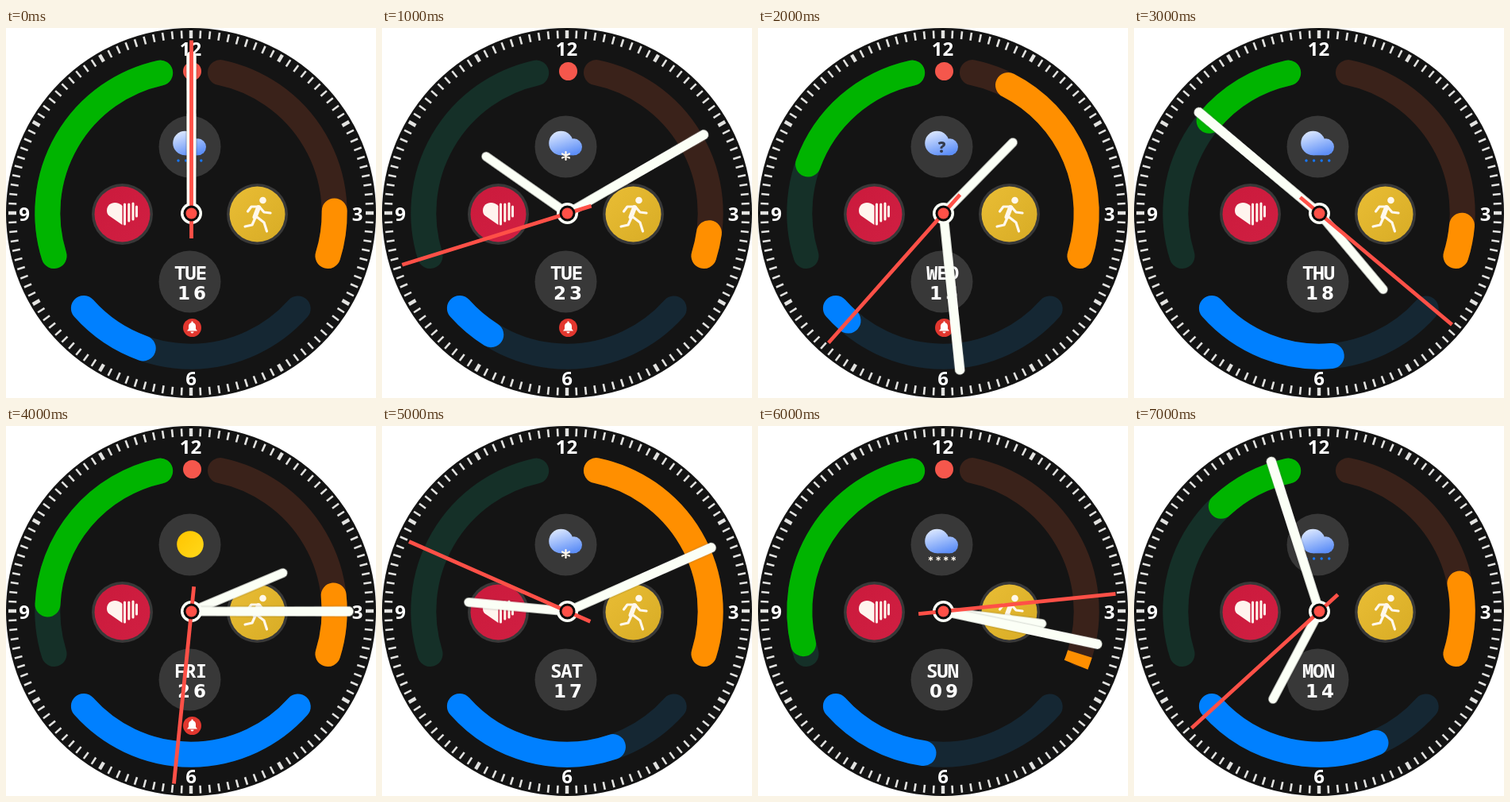
An HTML page for the animation above (8000 ms loop, 466 by 466 pixels).

```html
<!DOCTYPE html>
<html lang="en">
<head>
<meta charset="utf-8">
<title>Watch face</title>
<style>
  html, body { margin: 0; width: 100%; height: 100%; overflow: hidden; background: #fff; }
  svg { display: block; width: 466px; height: 466px; }
  text { fill: #fff; text-anchor: middle; }
  .hour-no { font: 700 24px "Open Sans", "Noto Sans", sans-serif; }
  #day { font: 700 24px "Noto Sans Mono", "DejaVu Sans Mono", monospace; letter-spacing: -1px; }
  #date { font: 700 23px "DejaVu Sans", sans-serif; letter-spacing: 4px; }
  .arc { fill: none; stroke-width: 32; stroke-linecap: round; }
  .hand { fill: #fbfff6; filter: drop-shadow(0 1px 1px rgba(0, 0, 0, .35)); }
  .line { fill: none; stroke: #fff8ec; stroke-linecap: round; stroke-linejoin: round; }
</style>
</head>
<body>
<svg viewBox="0 0 466 466">
  <defs>
    <linearGradient id="cloudFill" gradientUnits="userSpaceOnUse" x1="223" y1="130" x2="233" y2="161">
      <stop offset="0" stop-color="#d8e5ff"/><stop offset="1" stop-color="#5e8ff7"/>
    </linearGradient>
    <linearGradient id="sunFill" x1="0" y1="0" x2="1" y2="1">
      <stop offset="0" stop-color="#ffc400"/><stop offset="1" stop-color="#ffd91a"/>
    </linearGradient>
    <linearGradient id="redFill" x1="0" y1="0" x2="1" y2="1">
      <stop offset="0" stop-color="#cb1a3c"/><stop offset="1" stop-color="#d01f42"/>
    </linearGradient>
    <linearGradient id="goldFill" x1="0" y1="0" x2="1" y2="1">
      <stop offset="0" stop-color="#e9bd35"/><stop offset="1" stop-color="#d8ac25"/>
    </linearGradient>
  </defs>

  <circle cx="233" cy="233" r="233" fill="#141414"/>
  <g id="ticks" stroke="#e2e2e0"></g>
  <g class="hour-no">
    <text x="232.500" y="35.3">12</text>
    <text x="442.5" y="242.5">3</text>
    <text x="233" y="449.5">6</text>
    <text x="23" y="242.5">9</text>
  </g>
  <g id="arcs"></g>

  <g fill="#383838">
    <circle cx="231.5" cy="149.5" r="39"/>
    <circle cx="231.5" cy="319.5" r="39"/>
    <circle cx="146.5" cy="234.5" r="38.5"/>
    <circle cx="316.5" cy="234.5" r="38.5"/>
  </g>
  <circle cx="146.5" cy="234.5" r="35" fill="url(#redFill)"/>
  <circle cx="316.5" cy="234.5" r="35" fill="url(#goldFill)"/>

  <path d="M146.500 224C140 217 127 219 127 230Q127 234 130 236.500L146.500 248Z" fill="#fff4ee"/>
  <path d="M149.500 222V247M154.800 222V243M160 221V241M164.500 225V237" class="line" stroke-width="3"/>

  <circle cx="323.500" cy="217" r="4.300" fill="#fff8ec"/>
  <g class="line" stroke-width="3.200">
    <path d="M318 226L313.500 238" stroke-width="6"/>
    <path d="M304.500 231L309 225L319 225L325 232L333 233"/>
    <path d="M314 239L310 248L301 250M316 238L325 245L328.500 256"/>
  </g>

  <g id="sun"><circle cx="232" cy="149" r="16.800" fill="url(#sunFill)"/></g>
  <g id="cloud" fill="url(#cloudFill)">
    <circle cx="225.500" cy="145" r="15.300"/>
    <circle cx="241.500" cy="149.800" r="10.500"/>
    <rect x="225.500" y="148" width="16" height="12.300"/>
  </g>
  <text id="ask" x="231.500" y="157" style="font:800 19px 'Open Sans',sans-serif;fill:#343b4c">?</text>
  <path id="snow" class="line" stroke-width="2.200" d="M231.500 156V166M227 158.500L236 163.500M227 163.500L236 158.500"/>
  <g id="flurry"></g>
  <g id="rain" fill="#1677ff"></g>

  <text id="day" x="232" y="317"></text>
  <text id="date" x="236" y="341.500"></text>

  <circle id="link" cx="234.500" cy="54.500" r="11.500" fill="#f5574c"/>
  <g id="bell">
    <circle cx="234.500" cy="377.500" r="11.500" fill="#e2372f"/>
    <path d="M228 381.500L230 379V375.500A4.500 4.500 0 0 1 239 375.500V379L241 381.500ZM232.500 382.500H236.500A2 2 0 0 1 232.500 382.500ZM233.500 369.500H235.500V372H233.500Z" fill="#fff"/>
  </g>

  <g transform="translate(233.500 233.500)">
    <g id="hour"><path class="hand" d="M-5.700 0V-125A5.700 5.700 0 0 1 5.700 -125V0Z"/></g>
    <g id="minute"><path class="hand" d="M-5.700 0L-6.200 -198A6.200 6.200 0 0 1 6.200 -198L5.700 0Z"/></g>
    <circle r="13.500" fill="#fbfff6"/>
    <g id="second"><path d="M0 31.500V-218" stroke="#ff5047" stroke-width="4.800"/></g>
    <circle r="10" fill="#0b0b0b"/>
    <circle r="7" fill="#ff5047"/>
  </g>
</svg>

<script>
const STEP = 1000, MID = 233, RADIUS = 180.7;
const $ = id => document.getElementById(id);

function add(parent, tag, attrs) {
  const el = document.createElementNS("http://www.w3.org/2000/svg", tag);
  for (const key in attrs) el.setAttribute(key, attrs[key]);
  return parent.appendChild(el);
}

// Clockwise degrees from twelve o'clock
function point(deg, r) {
  const a = deg * Math.PI / 180;
  return (MID + r * Math.sin(a)).toFixed(2) + " " + (MID - r * Math.cos(a)).toFixed(2);
}

function arcPath(from, to) {
  return `M${point(from, RADIUS)}A${RADIUS} ${RADIUS} 0 0 ${to > from ? 1 : 0} ${point(to, RADIUS)}`;
}

for (let deg = 0; deg < 360; deg += 3) {
  add($("ticks"), "path", {
    d: `M${point(deg, 220)}L${point(deg, 230)}`,
    "stroke-width": deg % 30 ? 2.6 : 4.4
  });
}

const gauges = [
  { key: "green", from: -12.4, to: -107.4, track: "#153028", color: "#00b400" },
  { key: "orange", from: 107.4, to: 11.8, track: "#3a221a", color: "#ff8f00" },
  { key: "blue", from: 228.4, to: 131.8, track: "#152733", color: "#0080ff" }
];
for (const g of gauges) {
  add($("arcs"), "path", { class: "arc", stroke: g.track, d: arcPath(g.from, g.to) });
  g.bar = add($("arcs"), "path", { class: "arc", stroke: g.color });
}

for (let i = 0; i < 4; i++) {
  const x = 217 + i * 9.6;
  add($("rain"), "circle", { cx: x, cy: 167, r: 1.7 });
  add($("flurry"), "path", {
    class: "line", "stroke-width": 1.1,
    d: `M${x + .5} 164.5v5m-2.200 -3.800l4.400 2.600m0 -2.600l-4.400 2.600`
  });
}

// hour, minute, second, green, orange, blue, day, date, sky, link, bell
const states = [
  [0, 0, 0, -107.4, 89.2, 199.5, "TUE", "16", "rain", 1, 1],
  [305, 60, 252.7, null, 98, 212, "TUE", "23", "snow", 1, 1],
  [44.4, 174, 221.6, -70.1, 27, 221.4, "WED", "15", "ask", 1, 1],
  [140, 310, 130, -50, 95, 175, "THU", "18", "rain", 0, 0],
  [67.2, 90, 185.8, -87.3, 83.8, 131.8, "FRI", "26", "sun", 1, 1],
  [275.3, 66.1, 293.8, null, 11.8, 161.3, "SAT", "17", "snow", 0, 0],
  [97.1, 102, 84.2, -103.2, 112, 187.8, "SUN", "09", "flurry", 1, 0],
  [207.9, 342.2, 227.6, -43, 79, 156.7, "MON", "14", "rain", 0, 0]
];

const show = (id, on) => { $(id).style.display = on ? "" : "none"; };
const turn = (id, deg) => $(id).setAttribute("transform", `rotate(${deg})`);

function render(state) {
  const [hour, minute, second, green, orange, blue, day, date, sky, link, bell] = state;
  turn("hour", hour);
  turn("minute", minute);
  turn("second", second);
  const ends = { green, orange, blue };
  for (const g of gauges) {
    const end = ends[g.key];
    g.bar.setAttribute("d", end === null ? "" : arcPath(g.from, end));
    // An empty gauge overshoots its start as a square-ended stub
    g.bar.style.strokeLinecap = end > g.from && g.key === "orange" ? "butt" : "round";
  }
  $("day").textContent = day;
  $("date").textContent = date;
  for (const id of ["sun", "ask", "snow", "flurry", "rain"]) show(id, id === sky);
  show("cloud", sky !== "sun");
  show("link", link);
  show("bell", bell);
}

let current = -1;
const start = performance.now();
function tick() {
  const index = Math.floor((performance.now() - start) / STEP) % states.length;
  if (index !== current) render(states[current = index]);
  requestAnimationFrame(tick);
}
tick();
</script>
</body>
</html>
```
